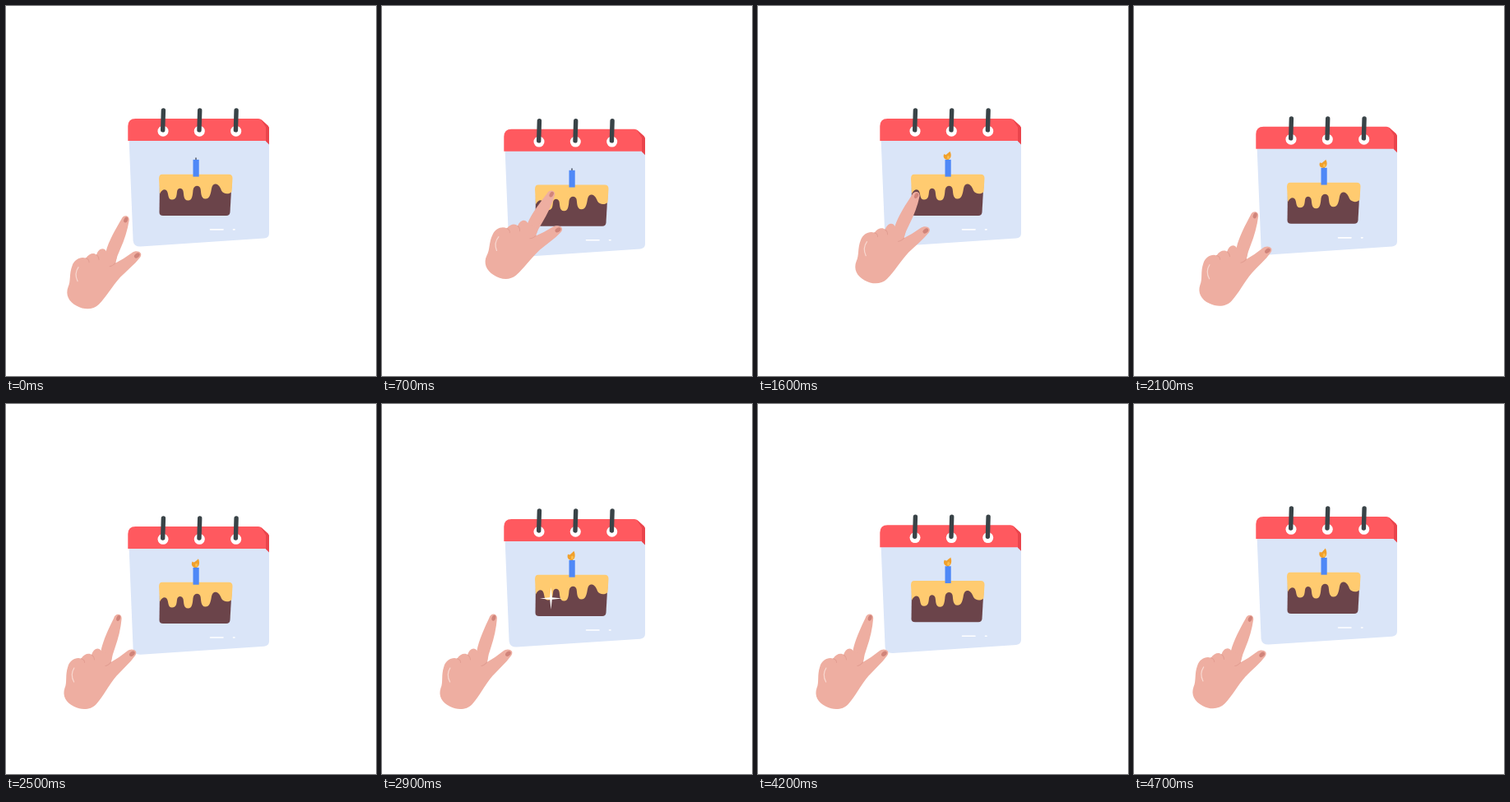
Write an HTML page with a canvas that moves like this. It is 450 px wide and 450 px high and loops after 4.8 s.

```html
<!DOCTYPE html>
<html lang="en">
<head>
<meta charset="utf-8">
<title>Birthday calendar</title>
<style>
html, body { margin: 0; width: 100%; height: 100%; overflow: hidden; background: #fff; }
canvas { display: block; width: 450px; height: 450px; }
</style>
</head>
<body>
<canvas id="stage" width="450" height="450"></canvas>
<script>
const ctx = document.getElementById('stage').getContext('2d');
const LOOP = 4800, STEP = 100;
const SKIN = '#eeaea1', NAIL = '#d0847a';

const shapes = {
  page: 'M149.5 160H320V276.5Q320 282 314 282.7L164 292.6Q155.5 293 154.6 285.5Z',
  header: 'M148.3 164V146Q148.500 137 157.5 137H307Q309.5 137 311 138.5L318.5 145.5Q320 147 320 149V164Z',
  fold: 'M310 138L318.5 145.500Q320 147 320 149V168.5L316 164.500V147.5Z',
  cake: 'M187 215H274.5L272.5 251Q272 255 268 255H191Q186.500 255 186.5 251Z',
  icing: 'M190 204.8H271Q275.5 204.8 275.5 209.500L274.5 226C271 229.5 264.5 229 262 224.5C259 215 251.5 214 250 222' +
    'C249 228 248 234.5 242.5 234.5C236.5 234.5 237.5 226 236.5 222C235 217.500 228.5 217.5 227.5 224' +
    'C227 230 226.5 236.5 221.5 236.5C215.500 236.5 216.5 229 215.5 225C214 220.5 208.500 221 208 226' +
    'C207.500 231 207 235.5 202 235.5C196.500 235.5 198 229 196 225.5C194 222 190 222.5 187 228.5L186 210Q186 204.8 190 204.8Z',
  flame: 'M0 0C-4 0 -6 -4 -4 -7.500C-3 -6 -1 -6.5 0 -8C1 -9 2.5 -10 3 -11C5.500 -7 4.5 0 0 0Z',
  hand: 'M133 314Q143 309 153 301.5C159 297 167.5 301 163 307C156 316 147 323 139 331C129 342 122 355 113 364' +
    'C106 371 95 371 86 366C76 361 72 352 75.5 343C79 336 76.5 327 80.500 317C83 309.500 91 305.5 97 308' +
    'C101 302 107 301 110 304C112 296.5 119 294 122 300L135 305Z',
  finger: 'M140.5 261C142.5 255 150.5 255.5 150 262C148 274 144 286 139 297Q135 305 133 314L116 312L121.5 300C125 287 134 272 140.5 261Z',
  creases: 'M97 308Q101 309 101 313M110 304Q113 306 113 310M133 314Q129 318 126 318',
  shine: 'M88 319Q82.5 327 87 336'
};
const paths = {};
for (const k in shapes) paths[k] = new Path2D(shapes[k]);

function fill(path, color) {
  ctx.fillStyle = color;
  ctx.fill(path);
}
function stroke(path, color, width) {
  ctx.strokeStyle = color;
  ctx.lineWidth = width;
  ctx.lineCap = 'round';
  ctx.stroke(path);
}
function line(x1, y1, x2, y2, color, width) {
  const p = new Path2D();
  p.moveTo(x1, y1);
  p.lineTo(x2, y2);
  stroke(p, color, width);
}
function oval(x, y, rx, ry, angle, color) {
  const p = new Path2D();
  p.ellipse(x, y, rx, ry, angle, 0, Math.PI * 2);
  fill(p, color);
}
function rotateAt(x, y, degrees) {
  ctx.translate(x, y);
  ctx.rotate(degrees * Math.PI / 180);
  ctx.translate(-x, -y);
}

// Cosine hump, 1 at mid and 0 beyond half, wrapping round the loop
function hump(t, mid, half) {
  const d = Math.abs((t - mid + LOOP * 1.5) % LOOP - LOOP / 2);
  return d < half ? (1 + Math.cos(Math.PI * d / half)) / 2 : 0;
}

function drawFlame(t) {
  const grow = Math.min(1, (t - 1000) / 300);
  if (grow <= 0) return;
  ctx.save();
  ctx.translate(230.5, 187);
  ctx.rotate(0.08 * Math.sin(t / 130));
  ctx.scale(grow, grow * (0.97 + 0.06 * Math.sin(t / 90)));
  fill(paths.flame, '#f0a02c');
  oval(1, -3, 1.6, 2.4, 0, '#fbbd4b');
  ctx.restore();
}

function drawSparkle(x, y, size) {
  if (size <= 0) return;
  const r = 14 * Math.sqrt(size), n = r * 0.13;
  const p = new Path2D();
  for (let i = 0; i < 8; i++) {
    const a = i * Math.PI / 4, q = i % 2 ? n : r;
    p.lineTo(x + q * Math.cos(a), y + q * Math.sin(a));
  }
  fill(p, '#fff');
}

function drawCalendar(t) {
  ctx.save();
  ctx.translate(0, -0.2 + 6.6 * (1 - Math.cos(Math.PI * (t + 40) / 800)));
  fill(paths.page, '#dae5f8');
  fill(paths.header, '#ff595f');
  fill(paths.fold, '#ea444c');
  for (const x of [191, 235.3, 279.7]) {
    oval(x, 152.3, 6.5, 6.5, 0, '#fff');
    line(x + 0.4, 127, x - 0.3, 151, '#394347', 5.4);
  }
  line(248.5, 272, 264, 272, '#fff', 1.6);
  line(276.5, 272, 278, 272, '#fff', 1.6);

  fill(paths.cake, '#6b444a');
  fill(paths.icing, '#ffcb70');
  line(231, 185, 231, 188, '#3a4252', 1.3);
  ctx.fillStyle = '#4e88f7';
  ctx.fillRect(227.5, 187, 7.2, 20.7);
  drawFlame(t);
  drawSparkle(205.5, 233.5, hump(t, 2850, 350));
  drawSparkle(257, 244.5, hump(t, 3550, 350));
  ctx.restore();
}

function drawHand(t) {
  const dx = 71 * hump(t, 1100, 1300) - 4;
  ctx.save();
  ctx.translate(dx, -1.3 - 0.7 * dx);
  rotateAt(100, 345, 7.5 * hump(t, 850, 1400) - 2.5);

  ctx.save();
  rotateAt(127, 305, 6 * hump(t, 1050, 2000) - 3.2);
  fill(paths.finger, SKIN);
  oval(146, 261.5, 2.3, 3.6, 0.4, NAIL);
  ctx.restore();

  fill(paths.hand, SKIN);
  stroke(paths.creases, '#e29e92', 1);
  stroke(paths.shine, '#f8d8d0', 1.2);
  oval(159.2, 304.8, 2.5, 3.8, 0.9, NAIL);
  ctx.restore();
}

function frame() {
  const now = performance.now() % LOOP;
  const t = Math.floor(now / STEP) * STEP;
  ctx.fillStyle = '#fff';
  ctx.fillRect(0, 0, 450, 450);
  drawCalendar(t);
  drawHand(t);
  requestAnimationFrame(frame);
}
frame();
</script>
</body>
</html>
```
